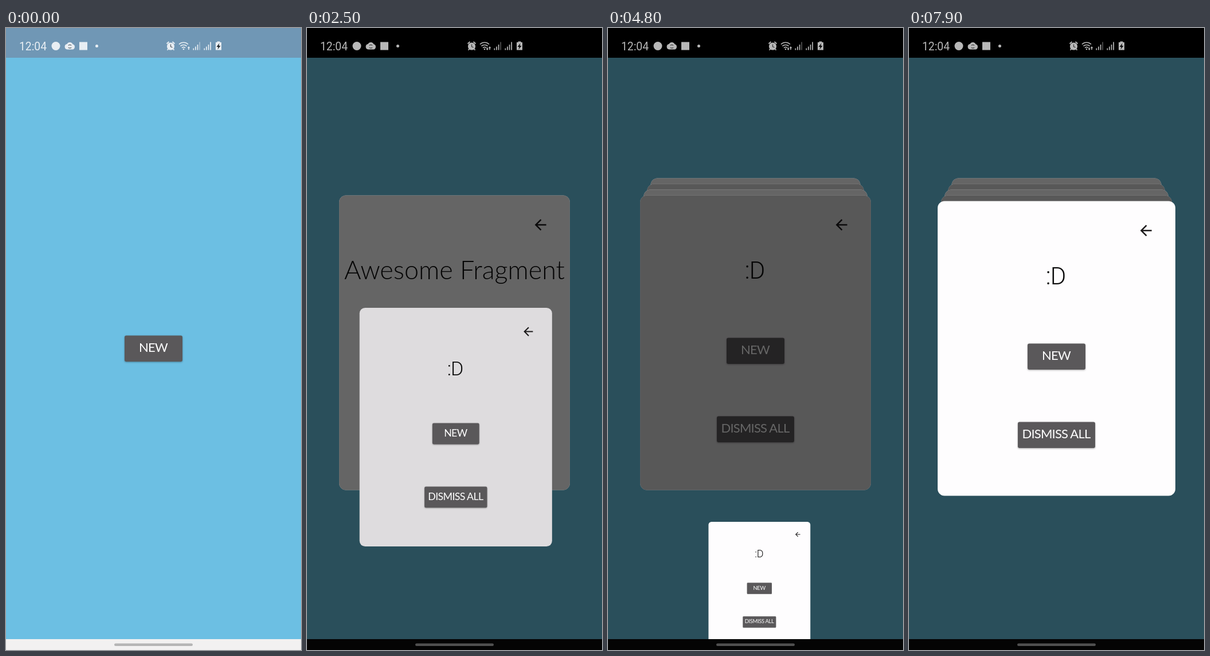
Write an HTML page that moves like this. It is 515 px wide and 1087 px high and loops after 8000 ms.

```html
<!DOCTYPE html>
<html lang="en">
<head>
<meta charset="utf-8">
<title>Stacked dialogs</title>
<style>
  html, body { margin: 0; width: 100%; height: 100%; overflow: hidden; background: #000; }
  svg { display: block; width: 515px; height: 1087px; }
  text { text-anchor: middle; }
  .clock { font: 19.3px Roboto, sans-serif; text-anchor: start; }
  .title { font: 300 45px Lato, sans-serif; fill: #0a0a0a; }
  .smile { font: 300 42px Roboto, sans-serif; letter-spacing: -1px; fill: #0a0a0a; }
  .label { font: 22px Lato, sans-serif; letter-spacing: -.8px; fill: #fff; }
  .button rect { fill: #5a585a; filter: drop-shadow(0 1.5px 1.5px rgba(0, 0, 0, .35)); }
</style>
</head>
<body>
<svg viewBox="0 0 515 1087">
  <rect width="515" height="1087" fill="#6cbfe3"/>
  <g id="home"></g>
  <rect id="dark" width="515" height="1087" fill="#2a4f5b"/>
  <g id="dimHome" opacity=".4"></g>
  <g id="stack"></g>

  <rect width="515" height="52" fill="#7097b5"/>
  <rect id="statusShade" width="515" height="52"/>
  <g id="icons" fill="#fff" stroke="#fff" stroke-width="0">
    <text class="clock" x="23" y="38.5">12:04</text>
    <circle cx="87" cy="31.5" r="7.5"/>
    <path d="M107 37.5a4.8 4.8 0 0 1-.5-9.5a5.5 5.5 0 0 1 10 .3a4.7 4.7 0 0 1-.6 9.2z"/>
    <path d="M109 30.5a3.2 3.2 0 0 1 5 0M114 34a3.2 3.2 0 0 1-5 0" fill="none" stroke="#666" stroke-width="1.3"/>
    <rect x="128" y="24.5" width="14" height="14"/>
    <circle cx="158.5" cy="31.5" r="2.5"/>
    <g fill="none">
      <circle cx="287.5" cy="32" r="5.8" fill="#fff" stroke-width="1.5"/>
      <path d="M280.5 27.5l4-3.5M294.5 27.5l-4-3.5M283.5 36.5l-2 2.2M291.5 36.5l2 2.2" stroke-width="1.8"/>
      <path d="M287.5 28.5v4l3 1.5" stroke="#555" stroke-width="1.3"/>
      <path d="M302 28.5a11.5 11.5 0 0 1 16 0M304.5 31.7a8 8 0 0 1 11 0M307 34.7a4.5 4.5 0 0 1 6 0" stroke-width="1.7"/>
    </g>
    <circle cx="310" cy="37" r="1.3"/>
    <path d="M319 32l2.3 3h-1.5v3h-1.6v-3h-1.5z"/>
    <path id="download" d="M314.7 39l2.2-2.7h-1.4v-2.3h-1.6v2.3h-1.4z"/>
    <g id="bars"></g>
    <path d="M368.5 25v-1.5h5v1.5h2.5v13.5h-10v-13.5z"/>
    <path d="M372.5 26.5l-5 6.5h3l-1 4.5 5-6.5h-3z" fill="#111"/>
  </g>

  <rect y="1068" width="515" height="19" fill="#f2f1f1"/>
  <rect id="navShade" y="1068" width="515" height="19" fill="#040404"/>
  <rect id="handle" x="189" y="1075.5" width="137" height="4.5" rx="2.25"/>
  <circle id="touch" r="14" fill="#fff" fill-opacity=".65" stroke="#9cc8d6" stroke-opacity=".45" stroke-width="2.5"/>
</svg>
<script>
const LOOP = 8000, PUSH = 250, POP = 200;
const MAX_DEPTH = 4, PIVOT = [269.5, 1283];
const pushes = [1380, 2360, 3153, 3953, 4740, 5371];
const moves = [
  ...pushes.map(at => ({ at, push: true })),
  { at: 6190 }, { at: 6567 }, { at: 7620, push: true }
];
// Each touch: start, end, and whether it lands on the back arrow.
const touches = [
  ...[1200, 2200, 2900, 3700, 4500, 5200, 7400].map(at => ({ at, end: at + 170 })),
  { at: 6100, end: 6250, back: true }, { at: 6490, end: 6650, back: true }
];

const byId = id => document.getElementById(id);
const clamp = v => Math.max(0, Math.min(1, v));
const mix = (a, b, k) => a + (b - a) * k;

function add(parent, name, attrs, text) {
  const el = document.createElementNS('http://www.w3.org/2000/svg', name);
  for (const key in attrs) el.setAttribute(key, attrs[key]);
  if (text) el.textContent = text;
  return parent.appendChild(el);
}

function addButton(parent, y, width, text) {
  const g = add(parent, 'g', { class: 'button' });
  add(g, 'rect', { x: 257.5 - width / 2, y, width, height: 45.5, rx: 3 });
  add(g, 'text', { class: 'label', x: 257, y: y + 28.5 }, text);
}

function makeCard(index) {
  const g = add(byId('stack'), 'g', {});
  const box = { y: 302.5, height: 515, rx: 12 };
  const base = add(g, 'rect', { ...box, fill: index % 2 ? '#dedcde' : '#fefdfe' });
  const arrow = add(g, 'path', {
    d: 'M20 11H7.83l5.59-5.59L12 4l-8 8 8 8 1.41-1.41L7.83 13H20z', fill: '#1c1a1b'
  });
  if (index) add(g, 'text', { class: 'smile', x: 256, y: 448 }, ':D');
  else add(g, 'text', { class: 'title', x: 257.5, y: 449 }, 'Awesome Fragment');
  addButton(g, 551.5, 101, 'NEW');
  addButton(g, 688.5, 135, 'DISMISS ALL');
  const shade = add(g, 'rect', { ...box, 'fill-opacity': .6 });
  return { g, base, arrow, shade };
}

// Cards further back are narrower and sit higher.
function place(card, depth, scale) {
  const visible = depth >= 0 && depth <= MAX_DEPTH;
  card.g.style.display = visible ? '' : 'none';
  if (!visible) return;
  const inset = 6.1 * depth;
  for (const rect of [card.base, card.shade]) {
    rect.setAttribute('x', 50 + inset);
    rect.setAttribute('width', 415 - 2 * inset);
  }
  card.shade.style.display = depth ? '' : 'none';
  card.arrow.setAttribute('transform', `translate(${398.7 - inset} 339) scale(1.25)`);
  const [dx, dy] = PIVOT.map(p => p * (1 - scale));
  card.g.setAttribute('transform', `translate(${dx} ${dy - 10 * depth}) scale(${scale})`);
}

function stackAt(t) {
  let count = 0, moving = -1, scale = 1;
  for (const { at, push } of moves) {
    if (t < at) break;
    const p = clamp((t - at) / (push ? PUSH : POP));
    if (push) count++; else count--;
    moving = p < 1 ? (push ? count - 1 : count) : -1;
    scale = push ? 1 - (1 - p) ** 2 : 1 - p * p;
  }
  return { count, moving, scale };
}

function draw(t) {
  const { count, moving, scale } = stackAt(t);
  cards.forEach((card, i) => {
    if (i === moving) place(card, 0, scale);
    else place(card, count - 1 - i, 1);
  });

  const dim = clamp((t - pushes[0]) / PUSH);
  for (const id of ['dark', 'statusShade', 'navShade']) byId(id).setAttribute('opacity', dim);
  byId('dimHome').style.display = dim > 0 && count < 2 ? '' : 'none';
  byId('icons').setAttribute('opacity', mix(.84, .72, dim));
  const grey = mix(181, 80, dim);
  byId('handle').setAttribute('fill', `rgb(${grey},${grey},${grey})`);
  byId('download').style.display = t < 2200 ? 'none' : '';

  const tap = touches.find(({ at, end }) => t >= at && t < end);
  const touch = byId('touch');
  touch.style.display = tap ? '' : 'none';
  if (tap) {
    touch.setAttribute('cx', tap.back ? 423.5 : 262);
    touch.setAttribute('cy', tap.back ? 342 : 572);
  }
}

for (const id of ['home', 'dimHome']) addButton(byId(id), 537.5, 101, 'NEW');
for (const x of [326.5, 345.5]) {
  [3, 6, 9.5, 14].forEach((height, i) => add(byId('bars'), 'rect', {
    x: x + i * 3.6, y: 38.5 - height, width: 1.7, height,
    opacity: i === 3 && x < 340 ? .45 : 1
  }));
}
const cards = pushes.map((_, i) => makeCard(i));

const begin = performance.now();
function tick() {
  draw((performance.now() - begin) % LOOP);
  requestAnimationFrame(tick);
}
tick();
</script>
</body>
</html>
```
